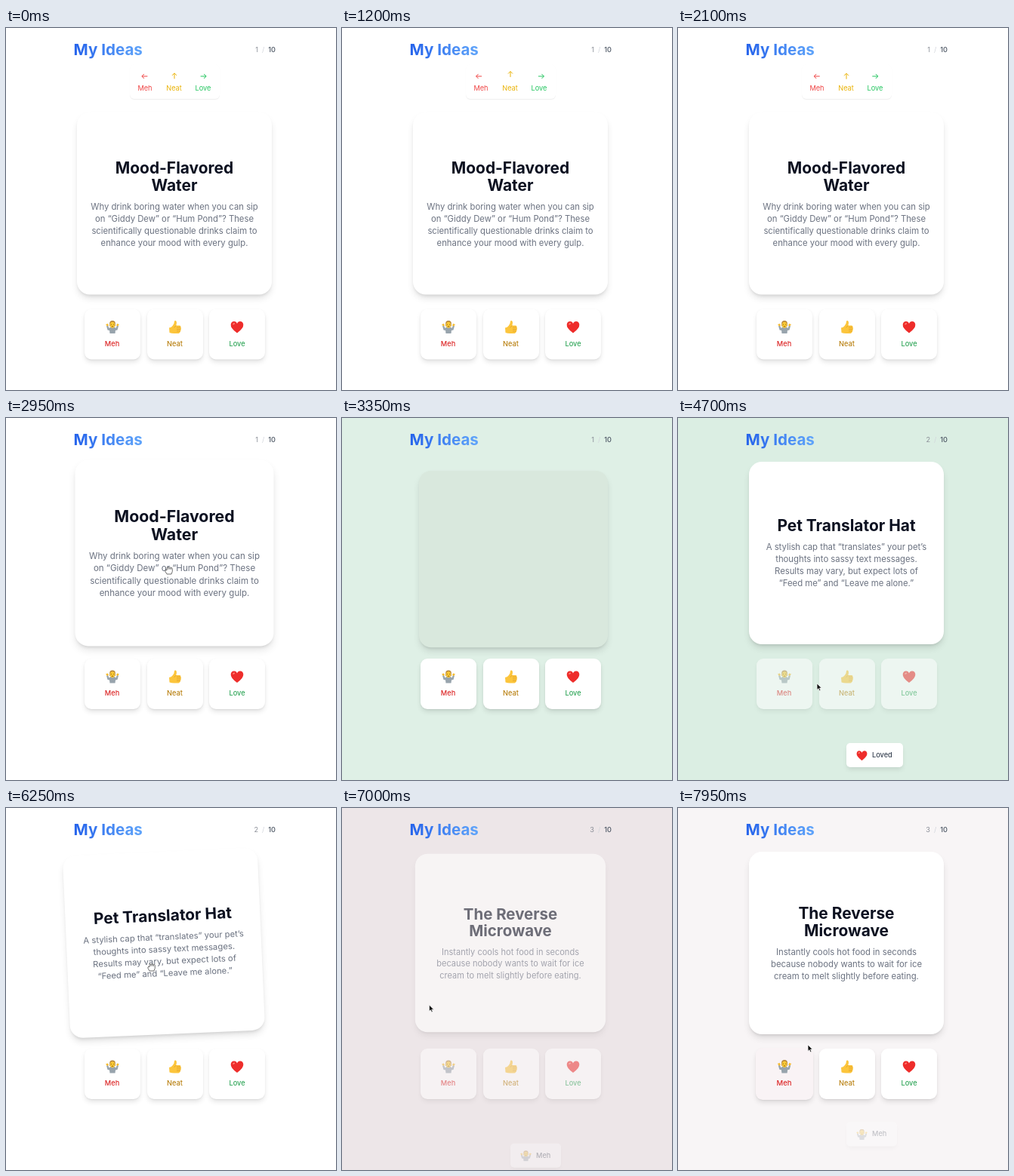
Write an HTML page that moves like this. It is 437 px wide and 480 px high and loops after 8 s.

```html
<!DOCTYPE html>
<html lang="en">
<head>
<meta charset="utf-8">
<title>My Ideas</title>
<style>
  html, body { margin: 0; width: 100%; height: 100%; overflow: hidden; }
  body { position: relative; font: 500 9.2px/12px Inter, sans-serif; }
  body > *, .at { position: absolute; white-space: nowrap; }
  h1 { left: 89.5px; top: 15px; margin: 0; font: 700 20.6px/27px Inter, sans-serif; color: transparent;
       background: linear-gradient(90deg, #2563eb, #60a5fa); background-clip: text; -webkit-background-clip: text; }
  #hints { left: 164px; top: 48px; width: 119px; height: 46px; border-radius: 6px; background: #fff;
           box-shadow: 0 1px 1px rgba(0,0,0,.07); }
  .hint { top: 10px; width: 40px; text-align: center; font-weight: 400; }
  .hint svg { display: block; margin: 0 auto 7.5px; overflow: visible; }
  #card { left: 94px; top: 58px; width: 258px; height: 242px; border-radius: 17px;
          display: flex; justify-content: center;
          box-shadow: 0 6px 10px -1px rgba(0,0,0,.11), 0 3px 4px -2px rgba(0,0,0,.12); }
  #copy { align-self: center; text-align: center; font: 400 11.3px/16px Inter, sans-serif; color: #6b7280; }
  #copy h2 { margin: 0 0 9px; font: 700 20.9px/23px Inter, sans-serif; color: #0b1020; }
  .button { top: 319px; width: 74px; height: 67px; border-radius: 9px; background: #fff; text-align: center;
            box-shadow: 0 4px 7px -1px rgba(0,0,0,.12), 0 1px 3px -1px rgba(0,0,0,.12); }
  .button svg { display: block; margin: 15px auto 6.5px; }
  #toast { left: 223px; top: 431px; height: 32px; padding: 0 14px 0 13px; border-radius: 5px; background: #fff;
           display: flex; align-items: center; gap: 6px; color: #374151;
           box-shadow: 0 4px 6px -1px rgba(0,0,0,.1); }
  #cursor { left: 0; top: 0; overflow: visible; }
</style>
</head>
<body>
<svg width="0" height="0">
  <symbol id="meh" viewBox="0 0 18 18">
    <path d="M1 7.500l2-.5 1.500 3.500L6.500 9h5l2 1.500L15 7l2 .5-1.500 5.500-2.500.5-.5 4h-7l-.5-4-2.500-.5z" fill="#98a4ad"/>
    <path d="M0 5.500l3-1 1 2.500-2 1zM18 5.500l-3-1-1 2.500 2 1z" fill="#f6bd35"/>
    <path d="M5.200 8V4q0-3.500 3.800-3.500T12.800 4v4z" fill="#b98a3d"/>
    <ellipse cx="9" cy="6.300" rx="3.100" ry="4" fill="#fcc934"/>
    <path d="M7 5.600h1M10 5.600h1M7.800 8.300h2.400" stroke="#6b4a17" stroke-width=".8"/>
  </symbol>
  <symbol id="neat" viewBox="0 0 18 18">
    <path d="M1 10q3-.5 4.500-2.500Q8 4.500 8 1.500 8.500 0 10 .8q1.800 1.500.3 6.200H15q2 .3 1.400 2.200 1.200 1.300.2 2.600.6 1.400-.6 2.400.3 1.400-1 2-.3 1.300-2 1.300H7.500Q4 17.300 1.500 16.500z" fill="#fcc53c"/>
    <path d="M11 9.300h5M11 11.900h5M11 14.400h4.500M10.300 7Q9 9 7.500 9.500" stroke="#dc9a24" fill="none" stroke-width=".7"/>
  </symbol>
  <symbol id="love" viewBox="0 0 18 18">
    <path d="M9 17Q0 10.500.7 5.500 1.400 1.500 5 1.500 8 1.600 9 4.500 10 1.600 13 1.500q3.600 0 4.300 4Q18 10.500 9 17z" fill="#ee2d2b"/>
    <ellipse cx="4.600" cy="4.800" rx="1.600" ry="1" fill="#ff8276" transform="rotate(-35 4.600 4.800)"/>
  </symbol>
</svg>
<h1>My Ideas</h1>
<div id="index" style="right:calc(100% - 334px);top:23px;color:#8b8f98;font-weight:400"></div>
<div style="left:339px;top:23px;color:#d1d5db;font-weight:400">/</div>
<div style="right:calc(100% - 357px);top:23px;color:#4b5563">10</div>
<div id="hints"></div>
<div id="card"><div id="copy"></div></div>
<div id="buttons" style="left:0;top:0"></div>
<div id="toast"><svg width="15" height="15"><use/></svg><span></span></div>
<svg id="cursor" width="1" height="1">
  <path id="pointer" d="M0 0v8.500l2-1.800 1.300 3 1.500-.7-1.300-2.900H6.200z" fill="#111" stroke="#fff" stroke-width=".7"/>
  <path id="hand" d="M-3 5L-5 1.500Q-5.500-.5-4-.8L-3 0V-3.500q.9-1.600 1.800 0 .9-1.600 1.900 0 .9-1.400 1.800.3 1-1 1.800.6V1.500L3 5zM-1.200-3.500v2.200M.7-3.500v2.200M2.500-3.200v2" fill="#fff" stroke="#333" stroke-width=".7"/>
</svg>
<script>
const LOOP = 8000, HINT_SPACE = 53.5;
const $ = id => document.getElementById(id);

const choices = [
  { icon: "meh", label: "Meh", hint: "#ef4444", color: "#dc2626", x: 103.5, hintX: 0, dx: -1, dy: 0, arrow: "M8 4H.5M3.500 1l-3 3 3 3" },
  { icon: "neat", label: "Neat", hint: "#eab308", color: "#b98012", x: 186.5, hintX: 38.5, dx: 0, dy: -1, arrow: "M4 8V.5M1 3.500l3-3 3 3" },
  { icon: "love", label: "Love", hint: "#22c55e", color: "#2fa558", x: 269, hintX: 77, dx: 1, dy: 0, arrow: "M0 4h7.500M4.500 1l3 3-3 3" },
];
const ideas = [
  ["Mood-Flavored<br>Water", "Why drink boring water when you can sip<br>on “Giddy Dew” or “Hum Pond”? These<br>scientifically questionable drinks claim to<br>enhance your mood with every gulp."],
  ["Pet Translator Hat", "A stylish cap that “translates” your pet’s<br>thoughts into sassy text messages.<br>Results may vary, but expect lots of<br>“Feed me” and “Leave me alone.”"],
  ["The Reverse<br>Microwave", "Instantly cools hot food in seconds<br>because nobody wants to wait for ice<br>cream to melt slightly before eating."],
];
const swipes = [
  { release: 3200, next: 3850, done: 4700, icon: "love", label: "Loved", tint: [219, 238, 227], ghost: [217, 232, 221] },
  { release: 6350, next: 6950, done: 7800, icon: "meh", label: "Meh", tint: [237, 230, 232], ghost: [232, 223, 225] },
];

$("hints").innerHTML = choices.map(c => `<div class="at hint" style="left:${c.hintX}px;color:${c.hint}">
  <svg width="8" height="8"><path d="${c.arrow}" fill="none" stroke="currentColor"/></svg>${c.label}</div>`).join("");
$("buttons").innerHTML = choices.map(c => `<div class="at button" style="left:${c.x}px;color:${c.color}">
  <svg width="18" height="18"><use href="#${c.icon}"/></svg>${c.label}</div>`).join("");
const arrows = document.querySelectorAll(".hint svg");
const buttons = document.querySelectorAll(".button");

const clamp = v => Math.min(1, Math.max(0, v));
const smooth = p => p * p * (3 - 2 * p);
const easeOut = p => 1 - (1 - p) ** 2;
const span = (t, from, to, ease = smooth) => ease(clamp((t - from) / (to - from)));
const mix = (a, b, p) => a + (b - a) * p;
const blend = (color, p) => `rgb(${color.map(c => mix(255, c, p))})`;

// keys: [time, value] pairs, eased between neighbours
function track(t, keys) {
  let value = keys[0][1];
  for (let i = 1; i < keys.length; i++)
    value = mix(value, keys[i][1], span(t, keys[i - 1][0], keys[i][0]));
  return value;
}

const dragX = t => track(t, [[2950, 0], [3200, 130], [3350, 4], [3600, 0], [6180, 0], [6250, -14], [6380, -125], [6500, -4], [6750, 0]]);
const hoverScale = t => 1 + track(t, [[2700, 0], [2850, .02], [3100, .02], [3200, 0], [5550, 0], [5750, .02], [6000, .02], [6060, 0]]);

let shownIndex = -1;
function drawCard(t, swipe, index, shift) {
  if (index !== shownIndex) {
    const [title, text] = ideas[index];
    $("copy").innerHTML = `<h2>${title}</h2>${text}`;
    $("index").textContent = index + 1;
    shownIndex = index;
  }
  let x = dragX(t), y = 0, scale = hoverScale(t), opacity = 1, leave = 0;
  if (swipe && t < swipe.next) {
    leave = span(t, swipe.release, swipe.release + 140);
    opacity = 1 - span(t, swipe.release + 250, swipe.release + 400);
    y = 8 * leave;
    scale = mix(scale, .97, leave);
  } else if (swipe) {
    const enter = span(t, swipe.next - 50, swipe.next + 250, easeOut);
    opacity = enter;
    scale *= mix(.95, 1, enter);
  }
  const card = $("card");
  card.style.transform = `translate(${x}px,${y + shift}px) rotate(${x * .18 * (1 - leave)}deg) scale(${scale})`;
  card.style.opacity = opacity;
  card.style.background = swipe ? blend(swipe.ghost, leave) : "#fff";
  $("copy").style.opacity = 1 - leave;
}

function drawToast(t, swipe) {
  const visible = swipe && t >= swipe.next;
  const toast = $("toast");
  toast.style.visibility = visible ? "visible" : "hidden";
  if (!visible) return;
  const enter = span(t, swipe.next, swipe.next + 300, easeOut);
  const exit = span(t, swipe.done, swipe.done + 230);
  toast.querySelector("use").setAttribute("href", "#" + swipe.icon);
  toast.querySelector("span").textContent = swipe.label;
  toast.style.opacity = enter * (1 - exit);
  toast.style.transform = `translateY(${20 * (1 - enter) - 20 * exit}px)`;
}

function drawCursor(t) {
  const x = track(t, [[2600, 205], [2850, 216], [3250, 216], [3850, 330], [4650, 184], [5350, 184], [5800, 207], [6400, 207], [6800, 115], [6950, 115], [7750, 150], [7950, 172]]);
  const y = track(t, [[2600, 290], [2850, 202], [3250, 202], [3850, 240], [4650, 352], [5350, 352], [5800, 211], [6400, 211], [6800, 260], [6950, 260], [7750, 350], [7950, 314]]);
  const hand = (t > 2750 && t < 3200) || (t > 5550 && t < 6400);
  const hidden = t < 2600 || (t > 3200 && t < 3850);
  $("cursor").style.visibility = hidden ? "hidden" : "visible";
  $("cursor").style.transform = `translate(${x + (hand ? dragX(t) : 0)}px,${y}px)`;
  $("hand").style.display = hand ? "" : "none";
  $("pointer").style.display = hand ? "none" : "";
}

function draw(t) {
  const swipe = swipes.filter(s => t >= s.release - 50).pop();
  const index = swipes.filter(s => t >= s.next).length;
  const collapse = span(t, 2600, 2850);
  const shift = HINT_SPACE * (1 - collapse);

  const tint = swipe ? span(t, swipe.release - 50, swipe.release + 200) * (1 - span(t, swipe.done, swipe.done + 400, easeOut)) : 0;
  document.body.style.background = swipe ? blend(swipe.tint, tint) : "#fff";

  const bounce = 3 * Math.sin(Math.PI * (t - 300) / 2000) ** 2;
  $("hints").style.opacity = 1 - span(t, 2600, 2750);
  arrows.forEach((arrow, i) => {
    const { dx, dy } = choices[i];
    arrow.style.transform = `translate(${dx * bounce}px,${dy * bounce + 2}px)`;
  });

  const dim = swipe ? span(t, swipe.release + 200, swipe.release + 400) * (1 - span(t, swipe.done, swipe.done + 150)) : 0;
  const hover = span(t, 7820, 7950);
  $("buttons").style.transform = `translateY(${shift}px)`;
  buttons.forEach((button, i) => {
    const active = i === 0 ? hover : 0;
    button.style.opacity = 1 - dim / 2;
    button.style.transform = `scale(${1 + .03 * active})`;
    button.style.background = blend([249, 243, 245], active);
  });

  drawCard(t, swipe, index, shift);
  drawToast(t, swipe);
  drawCursor(t);
}

const start = performance.now();
function frame() {
  draw((performance.now() - start) % LOOP);
  requestAnimationFrame(frame);
}
frame();
</script>
</body>
</html>
```
